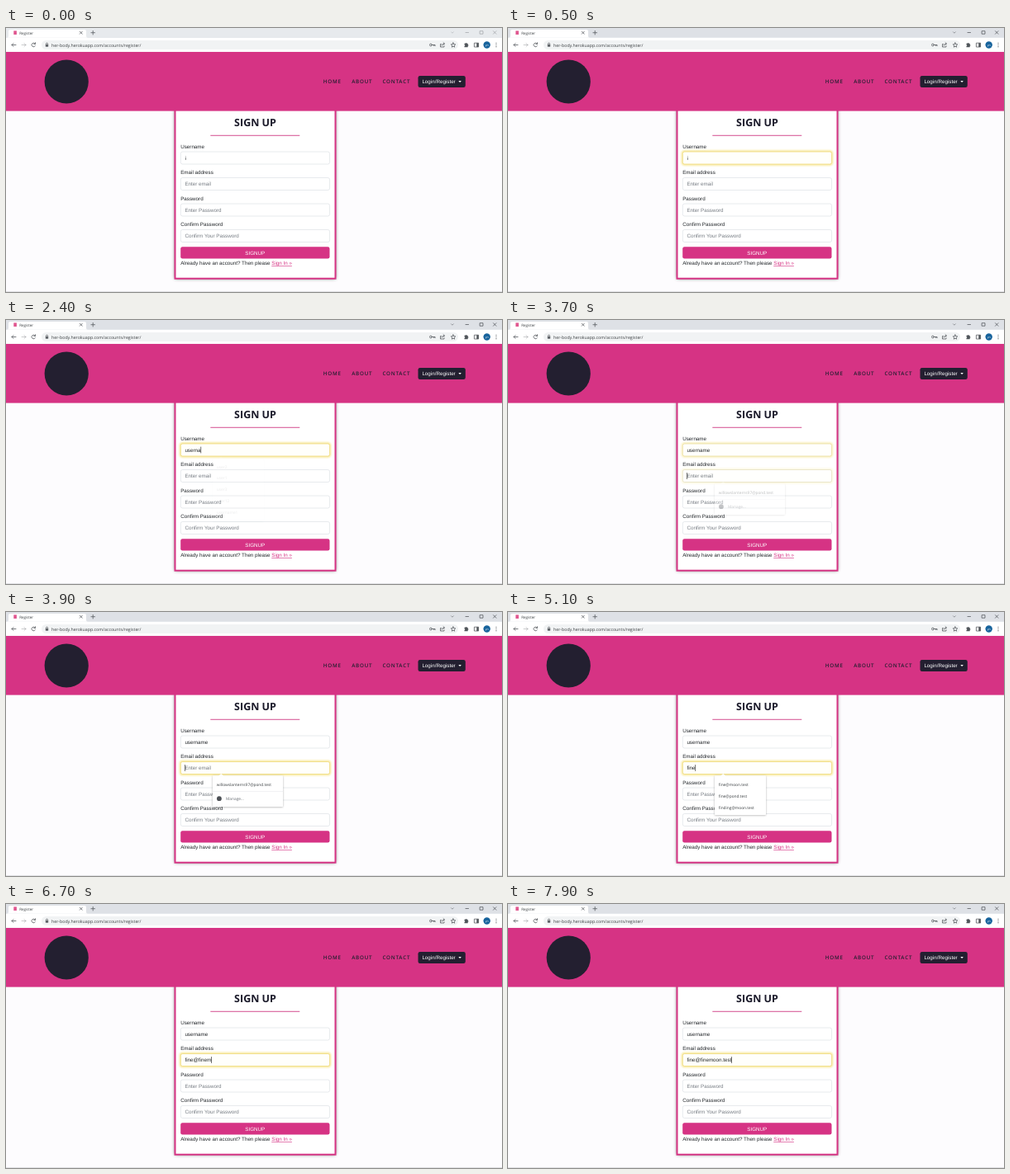
An HTML page that plays this animation: 600x320 px, repeating every 8 s.

```html
<!DOCTYPE html>
<html lang="en">
<head>
<meta charset="utf-8">
<title>Register</title>
<style>
  html, body { margin: 0; width: 100%; height: 100%; overflow: hidden; background: #fdfcfe; }
  svg { display: block; width: 600px; height: 320px; text-rendering: geometricPrecision; }
  text { font: 6.25px "Liberation Sans", Arial, sans-serif; fill: #212529; white-space: pre; }
  .ui { font: 4.83px "Open Sans", "Noto Sans", sans-serif; fill: #3c4043; }
  .soft { fill: #6c7177; }
  .hint { fill: #757b82; }
  .nav { font: 600 6.25px "Open Sans", "Noto Sans", sans-serif; letter-spacing: .78px; fill: #231f30; }
  .title { font: 700 12.5px "Open Sans", "Noto Sans", sans-serif; fill: #1b1a2a; }
  .icon { fill: none; stroke: #50555a; stroke-width: .75; stroke-linecap: round; stroke-linejoin: round; }
</style>
</head>
<body>
<svg id="stage" viewBox="0 0 600 320" xmlns="http://www.w3.org/2000/svg"></svg>
<script>
const PINK = '#d63384', DARK = '#231f30';
const FIELD_Y = { user: 150, email: 181.5, pass: 213, confirm: 244.5 };
const EMAIL = 'fine@finemoon.test';

const text = (x, y, s, cls = '', extra = '') => `<text x="${x}" y="${y}" class="${cls}" ${extra}>${s}</text>`;
const rect = (x, y, w, h, fill, extra = '') =>
  `<rect x="${x}" y="${y}" width="${w}" height="${h}" fill="${fill}" ${extra}/>`;
const disc = (x, y, r, fill) => `<circle cx="${x}" cy="${y}" r="${r}" fill="${fill}"/>`;
const icon = (d, extra = '') => `<path class="icon" d="${d}" ${extra}/>`;
const rule = (x, y, w) => rect(x, y, w, .5, '#e3e5e8');
const key = (x, y) => icon(`M${x + 2.8} ${y}h3.6v1.2M${x + 5} ${y}v1.2`) +
  `<circle class="icon" cx="${x + 1.2}" cy="${y}" r="1.4"/>`;

function field(name, label, hint) {
  const y = FIELD_Y[name];
  return text(211.2, y - 4.5, label) +
    rect(211.3, y, 180.3, 15, '#fff', 'rx="2.3" stroke="#ced4da" stroke-width=".5"') +
    `<g id="${name}Ring" opacity="0">` +
    rect(210.7, y - .6, 181.5, 16.2, 'none', 'rx="2.8" stroke="#f7e27c" stroke-width="1.6" filter="url(#glow)"') +
    rect(211.3, y, 180.3, 15, '#fffffb', 'rx="2.3" stroke="#efd768" stroke-width=".7"') + '</g>' +
    text(216.4, y + 9.8, hint, 'hint', `id="${name}Hint"`) +
    text(216.4, y + 9.8, '', '', `id="${name}Text"`);
}

function menu(id, y, w, h, content) {
  return `<g id="${id}" opacity="0">` +
    rect(250, y, w, h, '#fff', 'rx="1" filter="url(#lift)"') +
    `<path d="M257 ${y + .3}l3.2-2.8 3.2 2.8z" fill="#fff"/>` + content + '</g>';
}
const rows = (y, step, list) => list.map((s, i) => text(254.8, y + i * step, s, 'ui')).join('');

function login(y, name, dots) {
  let s = rect(256.2, y + 1.8, 3.4, 4.2, '#e06b9f') + text(266, y, name, 'ui');
  for (let i = 0; i < dots; i++) s += disc(266.8 + i * 2.12, y + 7.3, .62, '#62666b');
  return s;
}

const browser =
  rect(0, 0, 600, 28.8, '#fff') + rect(0, 0, 600, 11.8, '#dee1e6') +
  rect(0, 0, 600, 11.8, '#e7eaed', 'id="idleStrip"') +
  '<path d="M1 11.8q2 0 2-2V4q0-2 2-2h90q2 0 2 2v5.800q0 2 2 2z" fill="#fff"/>' +
  rect(9.3, 3.4, 3.6, 4.6, '#e0568f') +
  text(16.2, 7.6, 'Register', 'ui', 'style="font-size:4.5px"') +
  icon('M89.300 4.200l3 3m0-3l-3 3') + icon('M102.900 5.700h4.600m-2.300-2.300v4.600') +
  '<g id="windowButtons">' +
  icon('M538.500 4.800l1.400 1.400 1.400-1.400', 'stroke-opacity=".7"') +
  icon('M556 5.500h3.500M573.500 3.700h3.500v3.500h-3.500zM589.500 3.700l3.500 3.500m0-3.500l-3.500 3.500', 'stroke-width=".6"') +
  '</g>' +
  icon('M12 20.500h-5m2-2l-2 2 2 2') +
  icon('M19 20.500h5m-2-2l2 2-2 2', 'opacity=".4"') +
  icon('M35.300 19.200a2.300 2.300 0 1 0 .1 2.400M35.500 17.700v1.700h-1.800') +
  rect(43, 15, 504, 11, '#f1f3f4', 'rx="5.500"') +
  rect(47.800, 19.900, 3.400, 2.800, '#5f6368', 'rx=".4"') + icon('M48.500 20v-.8a1 1 0 0 1 2 0v.8', 'stroke-width=".6"') +
  text(55, 22.500, 'her-body.herokuapp.com/accounts/register/', 'ui', 'style="font-size:5.26px"') +
  key(512.700, 20.500) +
  icon('M526.500 19.500h-1v3.500h4.500v-1.200M527 21.300q.4-2.300 3.300-2.300m-1.200-1.300l1.400 1.300-1.400 1.300', 'stroke-width=".6"') +
  icon('M541 17.900l.8 1.800 2 .2-1.500 1.300.4 2-1.700-1-1.700 1 .4-2-1.500-1.300 2-.2z', 'stroke-width=".6"') +
  '<path d="M554.500 18.800h1.300a.8.8 0 0 1 1.600 0h1.300v1.400a.8.8 0 0 1 0 1.600v1.400h-4.200v-1.300a.8.8 0 0 0 0-1.600z" fill="#50555a"/>' +
  rect(566.800, 18.200, 4.800, 4.800, 'none', 'class="icon"') + rect(569.300, 18.200, 2.300, 4.800, '#50555a') +
  disc(581.700, 20.500, 4.200, '#17639c') +
  text(581.700, 21.700, 'yn', 'ui', 'text-anchor="middle" style="font-size:3.5px;fill:#fff"') +
  [18.300, 20.500, 22.700].map(y => disc(593, y, .6, '#50555a')).join('');

const page =
  rect(204.500, 60, 194, 243.700, '#000', 'filter="url(#cardShadow)" opacity=".6"') +
  rect(204.500, 60, 194, 243.700, '#fff', `stroke="${PINK}" stroke-width="2"`) +
  rect(0, 28.800, 600, 71.800, PINK) +
  disc(73.200, 65, 26.600, DARK) +
  text(383.800, 67.400, 'HOME', 'nav') + text(418.200, 67.400, 'ABOUT', 'nav') + text(455.500, 67.400, 'CONTACT', 'nav') +
  rect(498.500, 58, 57.300, 14, DARK, 'rx="2.300"') +
  text(503.400, 67.200, 'Login/Register', '', 'style="fill:#fff"') +
  '<path d="M547.300 64.100h3.600l-1.800 1.900z" fill="#fff"/>' +
  text(301.500, 118.500, 'SIGN UP', 'title', 'text-anchor="middle"') +
  rect(247.300, 129.800, 108, .9, '#cf3a83') +
  field('user', 'Username', 'Enter Username') +
  field('email', 'Email address', 'Enter email') +
  field('pass', 'Password', 'Enter Password') +
  field('confirm', 'Confirm Password', 'Confirm Your Password') +
  rect(211.200, 265.300, 180.300, 14.200, PINK, 'rx="2.300"') +
  text(301.300, 274.600, 'SIGNUP', '', 'text-anchor="middle" style="fill:#fff"') +
  text(211.200, 287.200, `Already have an account? Then please <tspan fill="${PINK}" text-decoration="underline">Sign In »</tspan>`) +
  rect(0, 319, 600, 1, '#e2e2e5');

const menus =
  menu('loginMenu', 168, 128, 81.500,
    login(179, 'headowner', 12) + login(202, 'lumo', 11) +
    disc(257.700, 223, 2.900, '#4285f4') +
    text(266, 224.700, 'Use passwords saved in your Quolva Account', 'ui soft') +
    rule(250, 231.300, 128) + disc(257.900, 240.200, 2.900, '#4d5156') +
    text(266, 241.900, 'Manage passwords...', 'ui soft') + key(365.500, 240.200)) +
  menu('nameMenu', 168, 61.500, 76, rows(179.700, 13.700, ['user2', 'user1', 'user3', 'user12', 'username1'])) +
  menu('addressMenu', 198.500, 85, 37.500,
    rows(210.500, 14, ['willowslanterns97@pond.test']) + rule(250, 217.300, 85) +
    disc(257.900, 226.200, 2.900, '#4d5156') + text(266, 227.900, 'Manage...', 'ui soft')) +
  menu('matchMenu', 198.500, 62, 47.500, rows(210.600, 14.200, ['fine@moon.test', 'fine@pond.test', 'finding@moon.test'])) +
  menu('shortMenu', 198.500, 62, 33.500, rows(210.600, 14.200, ['fine@moon.test', 'fine@pond.test']));

const shadow = (id, dy, blur, opacity) => `<filter id="${id}" x="-20%" y="-20%" width="140%" height="140%">
  <feDropShadow dx="0" dy="${dy}" stdDeviation="${blur}" flood-color="#000" flood-opacity="${opacity}"/></filter>`;
document.getElementById('stage').innerHTML = `<defs>
  <filter id="glow" x="-5%" y="-50%" width="110%" height="200%"><feGaussianBlur stdDeviation=".9"/></filter>
  <filter id="cardShadow" x="-10%" y="-10%" width="120%" height="120%"><feGaussianBlur stdDeviation="2.2"/></filter>
  ${shadow('lift', .5, .9, .32)}</defs>` +
  rect(0, 0, 600, 320, '#fdfcfe') + page + browser + menus + rect(0, 0, .6, 7.800, '#111', 'id="caret"');

const el = id => document.getElementById(id);
const ramp = (t, from, to) => Math.min(1, Math.max(0, (t - from) / (to - from)));
const during = (t, from, to) => +(t >= from && t < to);
const typed = (t, word, times) => word.slice(0, times.filter(at => t >= at).length);
const fade = (id, v) => el(id).setAttribute('opacity', v);

const NAME_KEYS = [1600, 1700, 1900, 2100, 2300, 2400, 2500, 2600];
const EMAIL_KEYS = [4600, 4800, 4900, 5100, 5400, 6000, 6200, 6300, 6400,
  6700, 6800, 7000, 7100, 7200, 7400, 7600, 7800, 7900];

function setField(name, value) {
  el(name + 'Text').textContent = value;
  fade(name + 'Hint', value ? 0 : 1);
}

function draw(t) {
  const awake = ramp(t, 0, 500), moved = ramp(t, 3600, 3900);
  fade('idleStrip', 1 - awake);
  fade('windowButtons', .45 + .55 * awake);

  setField('user', t < 1000 ? 'i' : typed(t, 'username', NAME_KEYS));
  setField('email', typed(t, EMAIL, EMAIL_KEYS));
  fade('userRing', awake * (1 - moved));
  fade('emailRing', moved);

  fade('loginMenu', ramp(t, 900, 1200) * during(t, 1000, 1600));
  fade('nameMenu', ramp(t, 1500, 1700) * (1 - ramp(t, 2200, 2420)));
  fade('addressMenu', moved * during(t, 3700, 4600));
  fade('matchMenu', during(t, 4600, 5400));
  fade('shortMenu', during(t, 5400, 6000) || .5 * during(t, 6000, 6100));

  const active = t < 3700 ? 'user' : 'email', caret = el('caret');
  const label = el(active + 'Text');
  const width = label.textContent ? label.getComputedTextLength() : 0;
  caret.setAttribute('x', 216.4 + width);
  caret.setAttribute('y', FIELD_Y[active] + 3.6);
  fade('caret', during(t, 800, 3100) || during(t, 3700, 4300) || during(t, 4600, 8000));
}

let start;
function tick(now) {
  start ??= now;
  draw(Math.floor((now - start) % 8000 / 100) * 100);
  requestAnimationFrame(tick);
}
draw(0);
requestAnimationFrame(tick);
</script>
</body>
</html>
```
